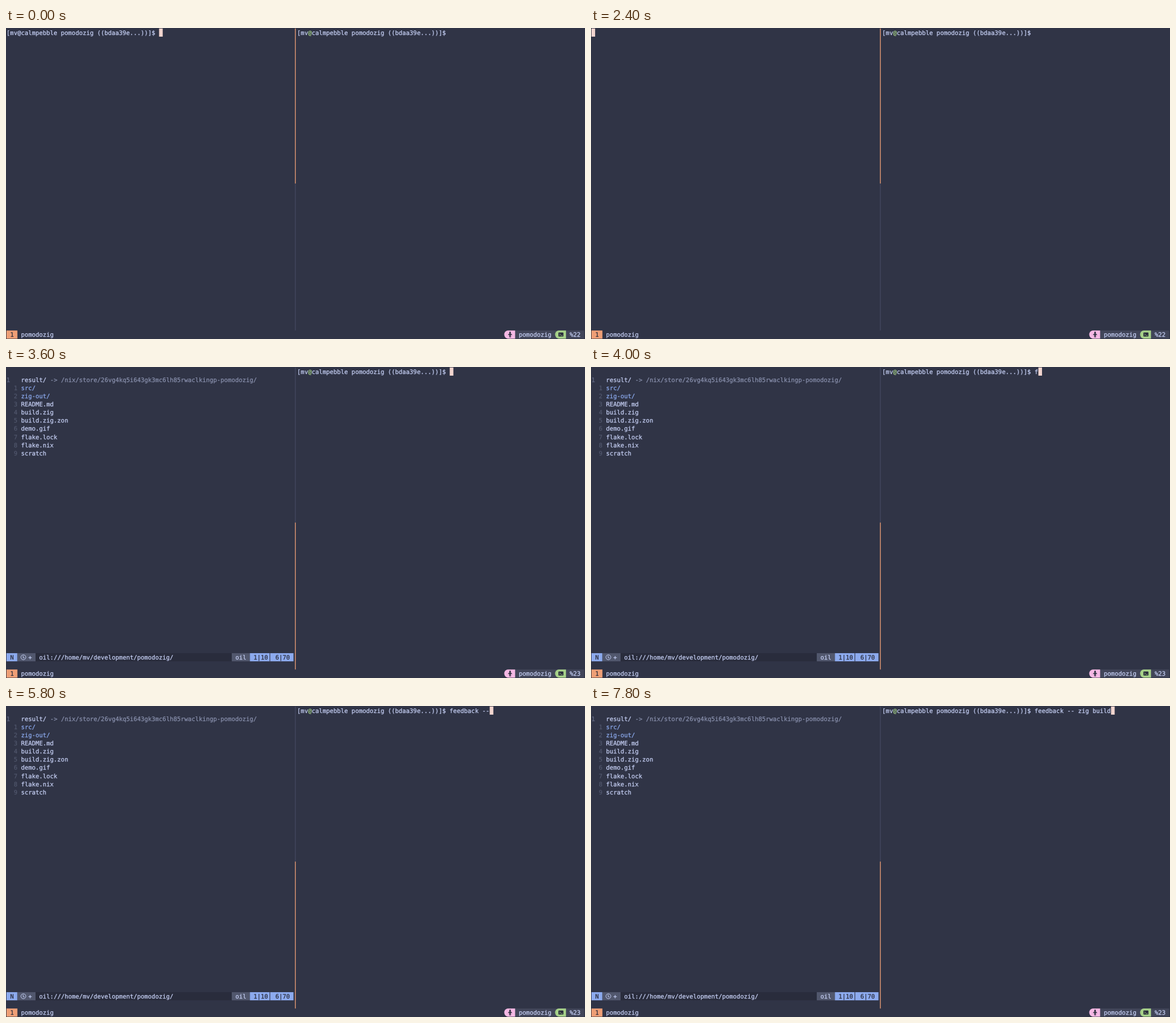
Write an HTML page with a canvas that moves like this. It is 1000x538 px and loops after 8 s.

```html
<!DOCTYPE html>
<html lang="en">
<head>
<meta charset="utf-8">
<title>Terminal session</title>
<style>
  html, body { margin: 0; width: 100%; height: 100%; overflow: hidden; background: #303446; }
  canvas { display: block; width: 1000px; height: 538px; }
</style>
</head>
<body>
<canvas id="stage" width="1000" height="538"></canvas>
<script>
const ctx = document.getElementById('stage').getContext('2d');
const W = 1000, H = 538, LOOP = 8000;
const CW = 6.275, CH = 14.12, PAD = 0.85;
const RIGHT = 80, STATUS = 35, BAR = 37;
const cx = col => PAD + col * CW;
const cy = row => PAD + row * CH;

const C = {
  base: '#303446', dark: '#292c3c', text: '#c6d0f5', dim: '#8990ad',
  number: '#51576d', current: '#646a85', panel: '#414559', chip: '#51576d',
  rule: '#434860', peach: '#ef9f76', blue: '#8caaee', green: '#a6d189',
  pink: '#f4b8e4', cursor: '#f2d5cf'
};

const PROMPT = '[mv@calmpebble pomodozig ((bdaa39e...))]$ ';
const FILES = ['src/', 'zig-out/', 'README.md', 'build.zig', 'build.zig.zon',
  'demo.gif', 'flake.lock', 'flake.nix', 'scratch'];

const OPEN_CMD = 'nvim .';
const RUN_CMD = 'feedback -- zig build';
// [time in ms, characters typed so far]
const OPEN_KEYS = [[1000, 2], [1200, 3], [1400, 4], [1600, 5], [1800, 6]];
const RUN_KEYS = [[4000, 1], [4200, 2], [4400, 3], [4600, 4], [4800, 5], [5000, 6],
  [5200, 8], [5600, 9], [5800, 11], [6200, 12], [6400, 13], [6800, 14],
  [7000, 16], [7200, 17], [7400, 18], [7600, 20], [7800, 21]];
const ENTER = 2200, CLEAR = 2400, EDITOR = 2600, SWITCH = 3400;

function typed(cmd, keys, t) {
  let n = 0;
  for (const [at, count] of keys) if (t >= at) n = count;
  return cmd.slice(0, n);
}

function box(col, row, cols, color) {
  ctx.fillStyle = color;
  ctx.fillRect(cx(col), cy(row), cols * CW, CH);
}

// The hairline outline gives the glyphs a slightly heavier stem
function print(str, col, row, color = C.text) {
  const x = cx(col), y = cy(row) + 10.8;
  ctx.fillStyle = ctx.strokeStyle = color;
  ctx.lineWidth = 0.25;
  ctx.fillText(str, x, y);
  ctx.strokeText(str, x, y);
}

function vline(x, y0, y1, color, width) {
  ctx.fillStyle = color;
  ctx.fillRect(x - width / 2, y0, width, y1 - y0);
}

function stroke(color, width, points) {
  ctx.strokeStyle = color;
  ctx.lineWidth = width;
  ctx.beginPath();
  points.forEach(([x, y], i) => i ? ctx.lineTo(x, y) : ctx.moveTo(x, y));
  ctx.stroke();
}

function disc(x, y, r, color) {
  ctx.fillStyle = color;
  ctx.beginPath();
  ctx.arc(x, y, r, 0, Math.PI * 2);
  ctx.fill();
}

// Three-cell badge with a rounded left edge
function badge(col, color) {
  box(col + 1, BAR, 2, color);
  ctx.beginPath();
  ctx.ellipse(cx(col + 1) + 0.3, cy(BAR + 0.5), CW + 0.3, CH / 2, 0, Math.PI / 2, Math.PI * 1.5);
  ctx.fill();
}

function personIcon(x, y) {
  disc(x, y - 3.6, 1.5, C.dark);
  ctx.fillStyle = C.dark;
  ctx.fillRect(x - 1.3, y - 1.8, 2.6, 3.8);
  stroke(C.dark, 1.2, [[x - 3.2, y + 0.6], [x - 1, y - 1.3], [x + 1, y - 1.3], [x + 3.2, y + 0.6]]);
  stroke(C.dark, 1.2, [[x - 0.9, y + 1.5], [x - 0.9, y + 5]]);
  stroke(C.dark, 1.2, [[x + 0.9, y + 1.5], [x + 0.9, y + 5]]);
}

function shellIcon(x, y) {
  ctx.fillStyle = C.dark;
  ctx.beginPath();
  ctx.roundRect(x - 4.3, y - 3.5, 8.6, 7, 1);
  ctx.fill();
  stroke(C.green, 0.9, [[x - 2.6, y - 1.7], [x - 0.8, y], [x - 2.6, y + 1.7]]);
  stroke(C.green, 0.9, [[x + 0.1, y + 1.7], [x + 2.8, y + 1.7]]);
}

function clockIcon(x, y) {
  ctx.strokeStyle = C.text;
  ctx.lineWidth = 1;
  ctx.beginPath();
  ctx.arc(x, y, 4.2, 0, Math.PI * 2);
  ctx.stroke();
  stroke(C.text, 1, [[x - 0.3, y - 2.6], [x - 0.3, y + 1], [x + 2, y + 1]]);
}

function shell(t) {
  if (t >= CLEAR) {
    box(0, 0, 1, C.cursor);
    return;
  }
  const line = PROMPT + typed(OPEN_CMD, OPEN_KEYS, t);
  print(line, 0, 0);
  if (t < ENTER) box(line.length, 0, 1, C.cursor);
  else box(0, 1, 1, C.cursor);
}

function editor(focused) {
  print('1', 0, 1, C.current);
  print('result/', 4, 1);
  print('-> /nix/store/26vg4kq5i643gk3mc6lh85rwaclkingp-pomodozig/', 12, 1, C.dim);
  if (focused) {
    box(4, 1, 1, C.cursor);
    print('r', 4, 1, C.dark);
  }
  FILES.forEach((name, i) => {
    print(String(i + 1), 2, i + 2, C.number);
    print(name, 4, i + 2, name.endsWith('/') ? C.blue : C.text);
  });

  box(0, STATUS, 79, C.dark);
  box(0, STATUS, 3, C.blue);
  print('N', 1, STATUS, C.dark);
  if (!focused) {
    box(3, STATUS, 5, C.chip);
    clockIcon(30, cy(STATUS + 0.5));
    print('+', 6, STATUS);
  }
  print('oil:///home/mv/development/pomodozig/', focused ? 4 : 9, STATUS);
  box(62, STATUS, 5, C.chip);
  print('oil', 63, STATUS);
  box(67, STATUS, 12, C.blue);
  print('1|10', 68, STATUS, C.dark);
  print('6|70', 74, STATUS, C.dark);
  vline(cx(72.5), cy(STATUS), cy(STATUS + 1), C.dark, 1);
}

function rightPane(t) {
  const line = PROMPT + typed(RUN_CMD, RUN_KEYS, t);
  print(line.slice(0, 3), RIGHT, 0);
  print('@', RIGHT + 3, 0, C.green);
  print(line.slice(4), RIGHT + 4, 0);
  if (t >= SWITCH) box(RIGHT + line.length, 0, 1, C.cursor);
}

function divider(leftActive) {
  const x = cx(79.5), mid = cy(19);
  const [top, bottom] = leftActive ? [C.peach, C.rule] : [C.rule, C.peach];
  vline(x, cy(0), mid, top, 1.3);
  vline(x, mid, cy(BAR), bottom, 1.3);
}

function statusBar(pane) {
  const mid = cy(BAR + 0.5);
  box(0, BAR, 3, C.peach);
  print('1', 1, BAR, C.dark);
  print('pomodozig', 4, BAR);
  box(140, BAR, 19, C.panel);
  badge(137, C.pink);
  personIcon(cx(138.6), mid);
  print('pomodozig', 141, BAR);
  badge(151, C.green);
  shellIcon(cx(152.6), mid);
  print('%' + pane, 155, BAR);
}

function draw(t) {
  const leftActive = t < SWITCH;
  ctx.fillStyle = C.base;
  ctx.fillRect(0, 0, W, H);
  if (t < EDITOR) shell(t);
  else editor(leftActive);
  rightPane(t);
  divider(leftActive);
  statusBar(leftActive ? 22 : 23);
}

ctx.font = `${CW / 0.602}px "DejaVu Sans Mono", "Noto Sans Mono", monospace`;
ctx.textRendering = 'geometricPrecision';
ctx.lineJoin = 'round';

const start = performance.now();
function tick() {
  draw((performance.now() - start) % LOOP);
  requestAnimationFrame(tick);
}
tick();
</script>
</body>
</html>
```
